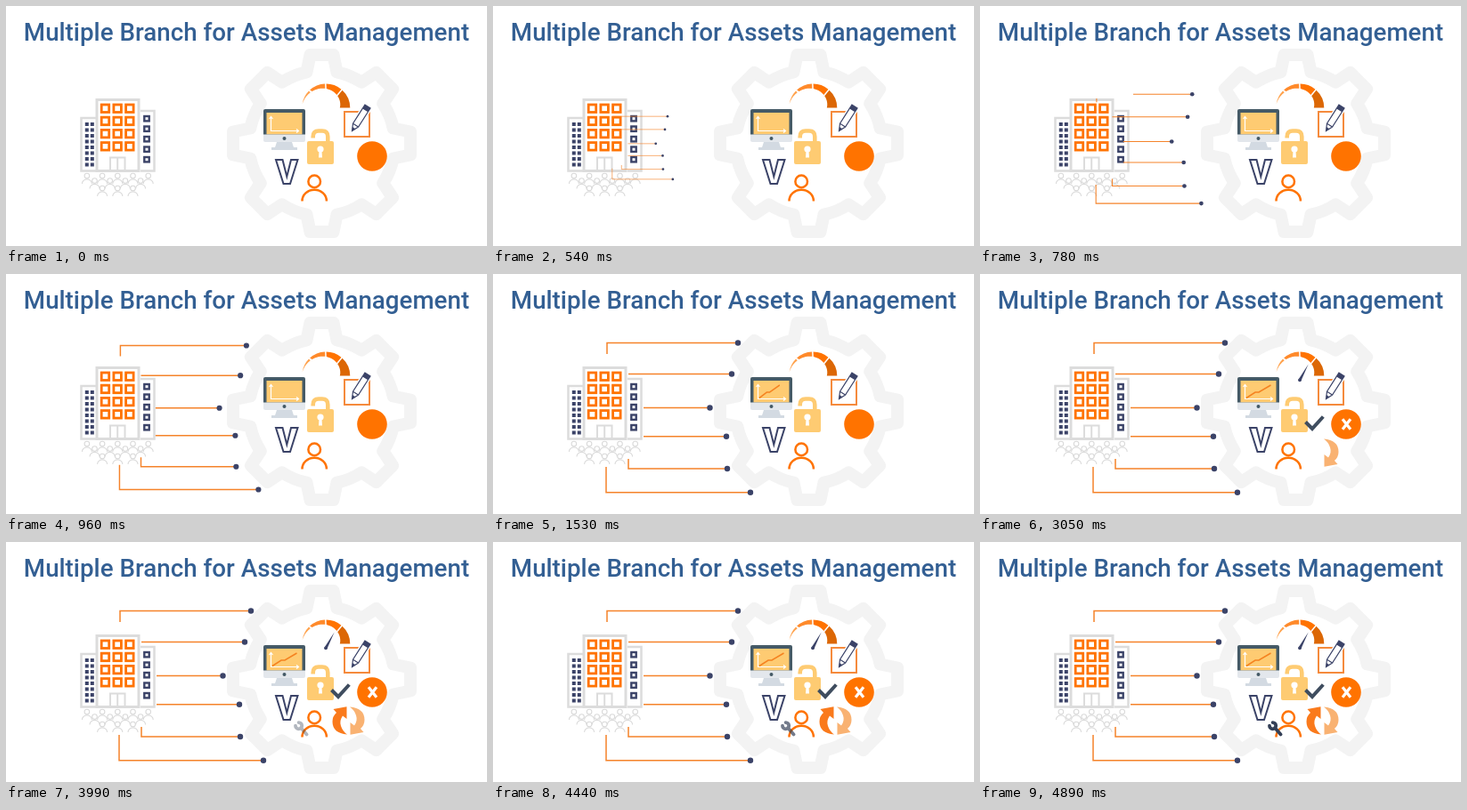
Write an HTML page with a canvas that moves like this. It is 540x270 px and loops after 4920 ms.

```html
<!DOCTYPE html>
<html lang="en">
<head>
<meta charset="utf-8">
<title>Assets Management</title>
<style>
  html, body { margin: 0; width: 100%; height: 100%; overflow: hidden; background: #fff; }
  canvas { position: absolute; left: 0; top: 0; }
  h1 {
    position: absolute; left: 0; top: 10px; width: 540px; margin: 0;
    font: 500 27.73px/40px Roboto, sans-serif; color: #335f93;
    text-align: center; white-space: nowrap;
  }
</style>
</head>
<body>
<canvas id="stage" width="540" height="270"></canvas>
<h1>Multiple Branch for Assets Management</h1>
<script>
const ctx = document.getElementById('stage').getContext('2d');
const LOOP = 4920;
const ORANGE = '#ff7300', NAVY = '#3b4368', SLATE = '#3f4d5f', YELLOW = '#fecb72', GREY = '#dcdcdc';

const progress = (t, from, to) => Math.min(1, Math.max(0, (t - from) / (to - from)));

function fillPath(color, path) {
  ctx.fillStyle = color;
  ctx.fill(new Path2D(path));
}

function strokePath(color, width, path) {
  ctx.strokeStyle = color;
  ctx.lineWidth = width;
  ctx.stroke(new Path2D(path));
}

function rect(color, x, y, w, h) {
  ctx.fillStyle = color;
  ctx.fillRect(x, y, w, h);
}

function frame(color, width, x, y, w, h) {
  ctx.strokeStyle = color;
  ctx.lineWidth = width;
  ctx.strokeRect(x, y, w, h);
}

function disc(color, x, y, r) {
  ctx.fillStyle = color;
  ctx.beginPath();
  ctx.arc(x, y, r, 0, Math.PI * 2);
  ctx.fill();
}

function ring(color, width, x, y, r) {
  ctx.strokeStyle = color;
  ctx.lineWidth = width;
  ctx.beginPath();
  ctx.arc(x, y, r, 0, Math.PI * 2);
  ctx.stroke();
}

// Runs draw() scaled horizontally from its left edge.
function stretch(left, amount, draw) {
  if (amount <= 0) return;
  ctx.save();
  ctx.translate(left, 0);
  ctx.scale(amount, 1);
  ctx.translate(-left, 0);
  draw();
  ctx.restore();
}

function gear() {
  const valley = 82, tip = 99.5, baseHalf = 17, tipHalf = 13;
  const spread = Math.asin(baseHalf / valley);
  ctx.save();
  ctx.translate(354.5, 154.5);
  ctx.beginPath();
  for (let k = 0; k < 8; k++) {
    const a = k * Math.PI / 4, c = Math.cos(a), s = Math.sin(a);
    for (const side of [-tipHalf, tipHalf]) ctx.lineTo(tip * c - side * s, tip * s + side * c);
    ctx.arc(0, 0, valley, a + spread, a + Math.PI / 4 - spread);
  }
  ctx.closePath();
  ctx.strokeStyle = '#f3f3f3';
  ctx.lineWidth = 14;
  ctx.lineJoin = 'round';
  ctx.stroke();
  ctx.restore();
}

function building() {
  strokePath(GREY, 2.5, 'M101 126H84.5V185.5H101 M151 118H166.5V185.5H151');
  frame(GREY, 3, 102, 105.5, 47, 80);
  strokePath(GREY, 2, 'M117 186V170.5H133.5V186 M125.2 170V186');
  for (let row = 0; row < 4; row++) {
    for (let col = 0; col < 3; col++) {
      frame(ORANGE, 2.8, 107.2 + col * 13.7, 111 + row * 14.2, 8.5, 8.5);
    }
  }
  for (let row = 0; row < 5; row++) frame(NAVY, 2.4, 155.3, 124 + row * 11.5, 5.4, 5.4);
  for (let row = 0; row < 8; row++) {
    for (const x of [88.8, 94.8]) rect(NAVY, x, 131 + row * 6.5, 4, 4);
  }
}

function person(color, width, x, y, r, reach, drop) {
  ring(color, width, x, y, r);
  ctx.beginPath();
  ctx.ellipse(x, y + drop, reach, drop - r - width, 0, Math.PI, 0);
  ctx.stroke();
}

function crowd() {
  const rows = [[5, 191], [4, 196.5], [3, 205]];
  for (const [count, y] of rows) {
    for (let i = 0; i < count; i++) {
      person('#dadada', 1.1, 125.3 + (i - (count - 1) / 2) * 17.2, y, 2.8, 5.5, 9);
    }
  }
}

function monitor() {
  fillPath('#d3dae2', 'M304 153H321L323 159H327V162H298V159H302Z');
  fillPath('#455a66', 'M291 116H334Q336 116 336 118V146H289V118Q289 116 291 116Z');
  rect(YELLOW, 292.5, 120, 40, 24.5);
  fillPath('#e3e7ec', 'M289 144.5H336V151Q336 153 334 153H291Q289 153 289 151Z');
  disc('#455a66', 312.5, 149, 2);
  strokePath('#fff', 1.2, 'M297.5 125V140.5H328 M295.5 127L297.5 124.5L299.5 127 M326 138.5L328.5 140.5L326 142.5');
}

function gauge() {
  const cx = 359.3, cy = 114.5, rad = Math.PI / 180;
  const stops = [188, 226, 269, 311, 360];
  const colors = ['#ffa24d', '#ff8a2b', ORANGE, '#dc6705'];
  const inner = deg => 27 - 11.5 * (deg - 188) / 172;
  colors.forEach((color, i) => {
    const from = stops[i] + (i ? 1.6 : 0), to = stops[i + 1] - (i < 3 ? 1.6 : 0);
    ctx.beginPath();
    ctx.arc(cx, cy, 27, from * rad, to * rad);
    for (let d = to; d >= from; d -= 2) {
      ctx.lineTo(cx + inner(d) * Math.cos(d * rad), cy + inner(d) * Math.sin(d * rad));
    }
    ctx.fillStyle = color;
    ctx.fill();
  });
}

function editIcon() {
  frame('#f58a3c', 2, 380, 119, 28, 28);
  ctx.save();
  ctx.translate(388.5, 140.5);
  ctx.rotate(Math.atan2(-29, 18.5));
  const outline = 'M0 0L7.5 -3.6H32.5V3.6H7.5Z';
  strokePath('#fff', 4, outline);
  fillPath('#fff', outline);
  strokePath(NAVY, 1.2, outline + 'M7.5 -3.6V3.6');
  fillPath(NAVY, 'M0 0L4 -1.9V1.9Z M27.5 -3.6H32.5V3.6H27.5Z');
  ctx.restore();
}

function lock() {
  strokePath(YELLOW, 4.6, 'M344.7 148.5V147Q344.7 140.5 351 140.5H355Q361.3 140.5 361.3 147V154');
  fillPath(YELLOW, 'M340 152H366Q368 152 368 154V176Q368 178 366 178H340Q338 178 338 176V154Q338 152 340 152Z');
  disc('#fff', 353, 161, 3.6);
  fillPath('#fff', 'M351.6 162H354.4L355 170.5H351Z');
}

function scenery() {
  gear();
  building();
  crowd();
  monitor();
  gauge();
  editIcon();
  lock();
  strokePath(NAVY, 2, 'M303 173H310.5L315.3 192L320 173H327.5L319 200H311.5Z');
  disc(ORANGE, 411, 169, 16.8);
  person(ORANGE, 2.5, 346.2, 197.4, 6.8, 13.7, 22);
}

// Each branch is a polyline whose last point carries the dot.
const branches = [
  [[128, 90], [128, 77.5], [275, 77.5]],
  [[152, 112.5], [268, 112.5]],
  [[169, 150.5], [243.5, 150.5]],
  [[169, 182.7], [262, 182.7]],
  [[152, 208], [152, 219], [263, 219]],
  [[127, 217], [127, 245.8], [289, 245.8]]
];

function drawBranches(t) {
  if (t < 300) return;
  const size = 0.07 + 0.93 * progress(t, 270, 990);
  ctx.save();
  if (t < 840) {
    ctx.beginPath();
    ctx.rect(172, 0, 368, 270);
    ctx.rect(0, 104, 172, 166);
    ctx.clip();
  }
  ctx.translate(138.7, 158);
  ctx.scale(size, size);
  ctx.translate(-138.7, -158);
  for (const points of branches) {
    strokePath('#f5832a', 1.5, 'M' + points.join('L'));
    disc(NAVY, ...points[points.length - 1], 3.2);
  }
  ctx.restore();
}

function needle() {
  fillPath(NAVY, 'M357.6 118.6L368.6 101.5L360.4 120.2Z');
  disc(NAVY, 359, 119.3, 1.9);
}

function cross(alpha) {
  ctx.globalAlpha = alpha;
  strokePath('#fff', 3.2, 'M407 163.3L416 174.7M416 163.3L407 174.7');
  ctx.globalAlpha = 1;
}

function arrow(color, turned) {
  ctx.save();
  ctx.translate(384.5, 201);
  if (turned) ctx.rotate(Math.PI);
  fillPath(color, 'M1.5 -15.5Q18 -14 18 -1Q18 5 13.5 9L17 13L2 15.7L2 2L6.5 5.5Q10.5 0 8.5 -6Q6.5 -12 1.5 -15.5Z');
  ctx.restore();
}

function wrench(alpha) {
  ctx.globalAlpha = alpha;
  ctx.strokeStyle = '#333f56';
  ctx.lineWidth = 3.8;
  ctx.lineCap = 'round';
  ctx.beginPath();
  ctx.arc(328.6, 206.7, 3.6, -Math.PI * 0.5, Math.PI);
  ctx.moveTo(331, 209);
  ctx.lineTo(337.6, 216.4);
  ctx.stroke();
  ctx.lineCap = 'butt';
  ctx.globalAlpha = 1;
}

function draw(t) {
  rect('#fff', 0, 0, 540, 270);
  scenery();
  drawBranches(t);
  const chart = 1 - Math.pow(1 - progress(t, 990, 1770), 1.5);
  stretch(299, chart, () => strokePath('#f58220', 1.5, 'M299 139.5L309 133L313 133L326.5 125'));
  stretch(357, progress(t, 1770, 2070), needle);
  stretch(364, progress(t, 1890, 2070), () => strokePath(SLATE, 4, 'M365.5 166.5L373 174L385.3 160.5'));
  cross(progress(t, 2410, 2950));
  if (t >= 3050) arrow('#f9b272', false);
  if (t >= 3320) arrow('#fa7a1c', true);
  wrench(progress(t, 3450, 4890));
}

const start = performance.now();
function tick() {
  draw((performance.now() - start) % LOOP);
  requestAnimationFrame(tick);
}
tick();
</script>
</body>
</html>
```
